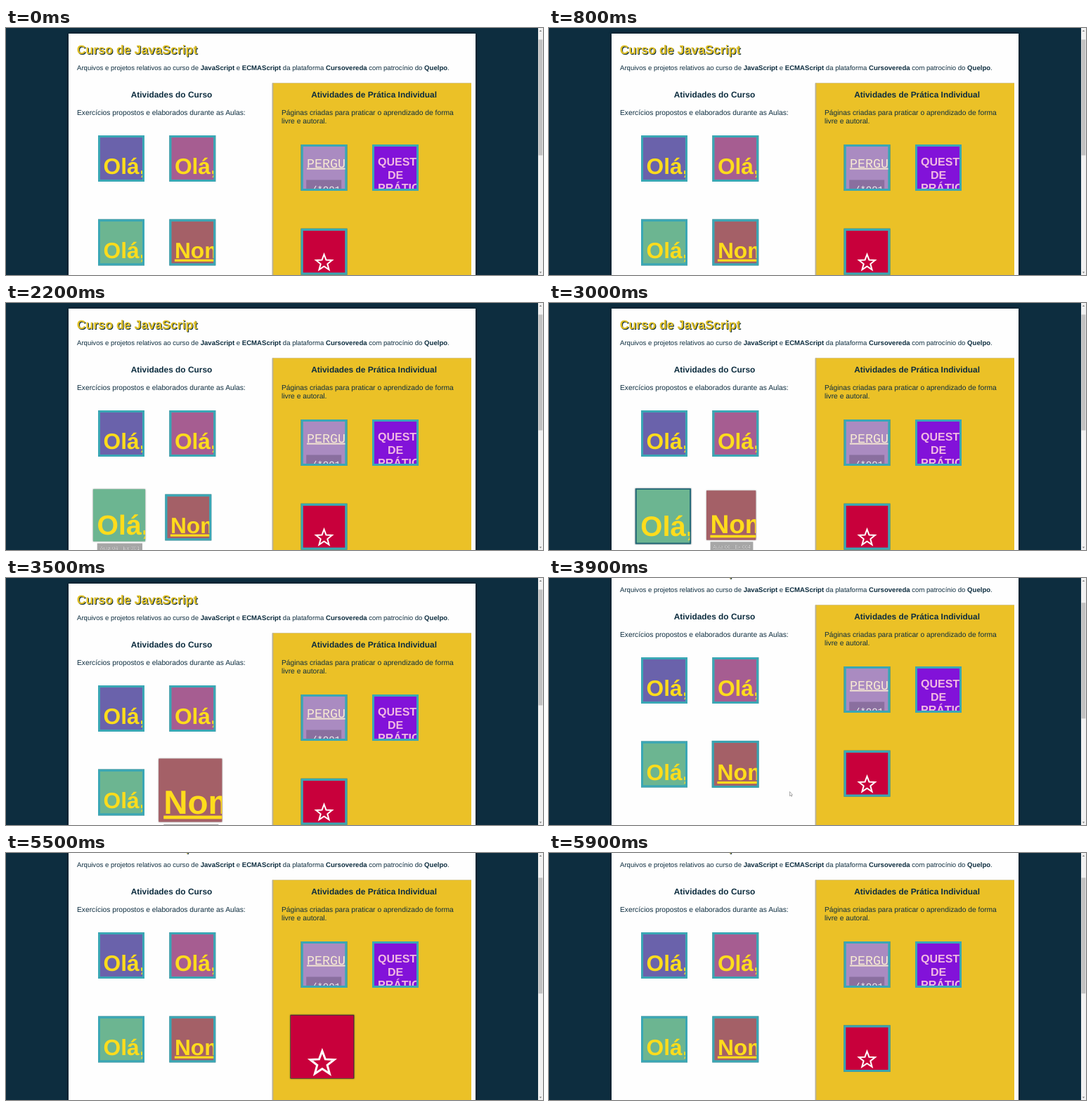
These frames come from a looping animation (764x352 px, 6 s). An HTML page:

```html
<!DOCTYPE html>
<html lang="pt-BR">
<head>
<meta charset="utf-8">
<title>Curso de JavaScript</title>
<style>
  html, body { margin: 0; width: 100%; height: 100%; overflow: hidden; background: #0d2d3f; }
  svg { display: block; width: 764px; height: 352px; }
  text { font-family: "Liberation Sans", Arial, sans-serif; fill: #0d2d3f; text-rendering: geometricPrecision; white-space: pre; }
  .b { font-weight: bold; }
  .mono { font-family: "Liberation Mono", "Courier New", monospace; }
  .u { text-decoration: underline; }
  .mid { text-anchor: middle; }
  .title { font-size: 17.75px; fill: #e0c026; filter: drop-shadow(1.2px 1.2px .7px #0d2d3f); }
  .lead { font-size: 9.58px; }
  .head { font-size: 11.88px; }
  .para { font-size: 10.27px; }
  .sheet { fill: #fefefe; filter: drop-shadow(0 0 2px rgba(0, 0, 0, .6)); }
  .panel { fill: #ebc127; filter: drop-shadow(.8px .6px .6px rgba(0, 0, 0, .5)); }
  .frame { filter: drop-shadow(.8px .8px .7px rgba(0, 0, 0, .45)); }
  .big { font-size: 31.7px; fill: #ffdc1c; }
  .tag text { font-size: 6.2px; fill: #fff; filter: drop-shadow(.5px .5px .3px rgba(0, 0, 0, .8)); }
</style>
</head>
<body>
<svg viewBox="0 0 764 352">
  <defs><clipPath id="face"><rect width="60" height="60"/></clipPath></defs>
  <rect width="764" height="352" fill="#0d2d3f"/>
  <g id="page">
    <rect class="sheet" x="89" y="8" width="579" height="480"/>
    <text class="title b" x="100.7" y="36.6">Curso de JavaScript</text>
    <text class="lead" x="101" y="60.2">Arquivos e projetos relativos ao curso de <tspan class="b">JavaScript</tspan> e <tspan class="b">ECMAScript</tspan> da plataforma <tspan class="b">Cursovereda</tspan> com patrocínio do <tspan class="b">Quelpo</tspan>.</text>
    <rect class="panel" x="379" y="78.600" width="283" height="400"/>
    <rect x="378.5" y="78.600" width="1.8" height="400" fill="#b8b198"/>
    <text class="head b mid" x="235.5" y="98.6">Atividades do Curso</text>
    <text class="head b mid" x="523.6" y="98.6">Atividades de Prática Individual</text>
    <text class="para" x="101" y="124">Exercícios propostos e elaborados durante as Aulas:</text>
    <text class="para" x="392" y="124">Páginas criadas para praticar o aprendizado de forma</text>
    <text class="para" x="392" y="136.4">livre e autoral.</text>
    <g id="cards"></g>
  </g>
  <path id="cursor" d="M342.5 304.5v6.2l1.4-1.3 1 2 .8-.4-.9-1.9h1.7z" fill="#fff" stroke="#777" stroke-width=".6"/>
  <rect x="757" width="7" height="352" fill="#f1f1f1"/>
  <path d="M758.8 5l1.7-2 1.7 2zM758.8 347.500l1.7 2 1.7-2z" fill="#777"/>
  <rect id="thumb" x="757.5" y="16.500" width="5.8" height="165" fill="#c1c1c1"/>
</svg>
<script>
const LOOP = 6000, STEP = 100, FADE = 500;
const SIDE = 60, EDGE = 3, GROW = 0.5, SCROLL = 40;
const TEAL = [58, 167, 181], NAVY = [13, 45, 63];
const $ = id => document.getElementById(id);

const word = (s, cls = '') => `<text class="big b ${cls}" x="4.600" y="52.100">${s}</text>`;

function star(cx, cy, r) {
  const pts = Array.from({ length: 10 }, (_, i) => {
    const a = i * Math.PI / 5, d = i % 2 ? r * 0.42 : r;
    return (cx + d * Math.sin(a)).toFixed(2) + ',' + (cy - d * Math.cos(a)).toFixed(2);
  });
  return `<polygon points="${pts.join(' ')}" fill="none" stroke="#fff" stroke-width="2"/>`;
}

const quiz = `<text class="mono u" x="5.500" y="29.700" font-size="18.300" style="fill:#f7ead2">PERGUNTA</text>
  <rect x="4.700" y="47.500" width="50" height="20" fill="#8a6f9f"/>
  <text class="mono" x="11.500" y="65.500" font-size="14" style="fill:#eee">/*001</text>`;
const practice = [['QUEST', 5], ['DE', 19], ['PRÁTIC', 5]].map(([s, x], i) =>
  `<text class="b" x="${x}" y="${27 + i * 18.7}" font-size="16" style="fill:#f1b9e2">${s}</text>`).join('');

// on / off: moments when the pointer enters and leaves
const cards = [
  { x: 131, y: 153, bg: '#6a62ab', art: word('Olá,') },
  { x: 232.3, y: 153, bg: '#a65d91', art: word('Olá,') },
  { x: 131, y: 272.5, bg: '#6cb591', art: word('Olá,'), tag: 'Aula 04 - Ex 001', on: 2060, off: 2860 },
  { x: 232.3, y: 272.5, bg: '#a46067', art: word('Nome', 'u'), tag: 'Aula 06 - Ex 004', on: 2890, off: 3520 },
  { x: 419.5, y: 166, bg: '#aa8bc1', art: quiz },
  { x: 521, y: 166, bg: '#8212d9', art: practice },
  { x: 419.5, y: 285.7, bg: '#c8003b', art: star(30, 46, 12), tag: 'Prática Aula - 11', on: 4290, off: 5490 }
];
cards[3].after = cards[2];

for (const c of cards) {
  c.el = document.createElementNS('http://www.w3.org/2000/svg', 'g');
  c.el.innerHTML = `<rect class="frame"/><g class="in">
    <g clip-path="url(#face)"><rect width="60" height="60" fill="${c.bg}"/>${c.art}</g>
    <g class="tag"><rect x="4.700" y="62.300" width="52" height="12.600" fill="#000" opacity=".35"/>
    <text class="mid u" x="30.700" y="70.300">${c.tag || ''}</text></g></g>`;
  [c.frame, c.inner, c.tagEl] = ['.frame', '.in', '.tag'].map(s => c.el.querySelector(s));
  $('cards').append(c.el);
}

// CSS "ease" curve
function ease(x) {
  if (x <= 0) return 0;
  if (x >= 1) return 1;
  const bez = (u, a, b) => 3 * (1 - u) ** 2 * u * a + 3 * (1 - u) * u * u * b + u ** 3;
  let lo = 0, hi = 1;
  for (let i = 0; i < 24; i++) {
    const mid = (lo + hi) / 2;
    if (bez(mid, 0.25, 0.25) < x) lo = mid; else hi = mid;
  }
  return bez(lo, 0.1, 1);
}

// The border drops at once on entry and grows back on leaving
function pose(c, t) {
  if (!c.tag || t < c.on) return { scale: 1, edge: EDGE, tint: 1, hot: false };
  if (t < c.off) return { scale: 1 + GROW * ease((t - c.on) / FADE), edge: 0, tint: 0, hot: true };
  const p = ease((t - c.off) / FADE);
  return { scale: 1 + GROW * (1 - p), edge: Math.max(0.4, EDGE * p), tint: p, hot: false };
}

function drawCard(c, t) {
  const { scale, edge, tint, hot } = pose(c, t);
  const size = SIDE + 2 * edge, half = size / 2;
  const shift = c.after ? 2 * (pose(c.after, t).edge - EDGE) : 0;
  c.el.setAttribute('transform',
    `translate(${c.x + shift + half} ${c.y + half}) scale(${scale}) translate(${-half} ${-half})`);
  // without a border only the face's own colour may show at the rim
  const rim = `rgb(${NAVY.map((v, i) => Math.round(v + (TEAL[i] - v) * tint))})`;
  c.frame.setAttribute('width', size);
  c.frame.setAttribute('height', size);
  c.frame.setAttribute('fill', hot ? c.bg : rim);
  c.inner.setAttribute('transform', `translate(${edge} ${edge})`);
  c.tagEl.style.display = hot ? '' : 'none';
}

function draw(t) {
  const y = SCROLL * ease((t - 3750) / 150);
  $('page').setAttribute('transform', `translate(0 ${-y})`);
  $('thumb').setAttribute('y', 16.5 + y * 0.47);
  $('cursor').style.display = t >= 3900 && t < 5500 ? '' : 'none';
  for (const c of cards) drawCard(c, t);
}

const start = performance.now();
function tick() {
  const t = (performance.now() - start) % LOOP;
  draw(Math.floor(t / STEP) * STEP);
  requestAnimationFrame(tick);
}
tick();
</script>
</body>
</html>
```
